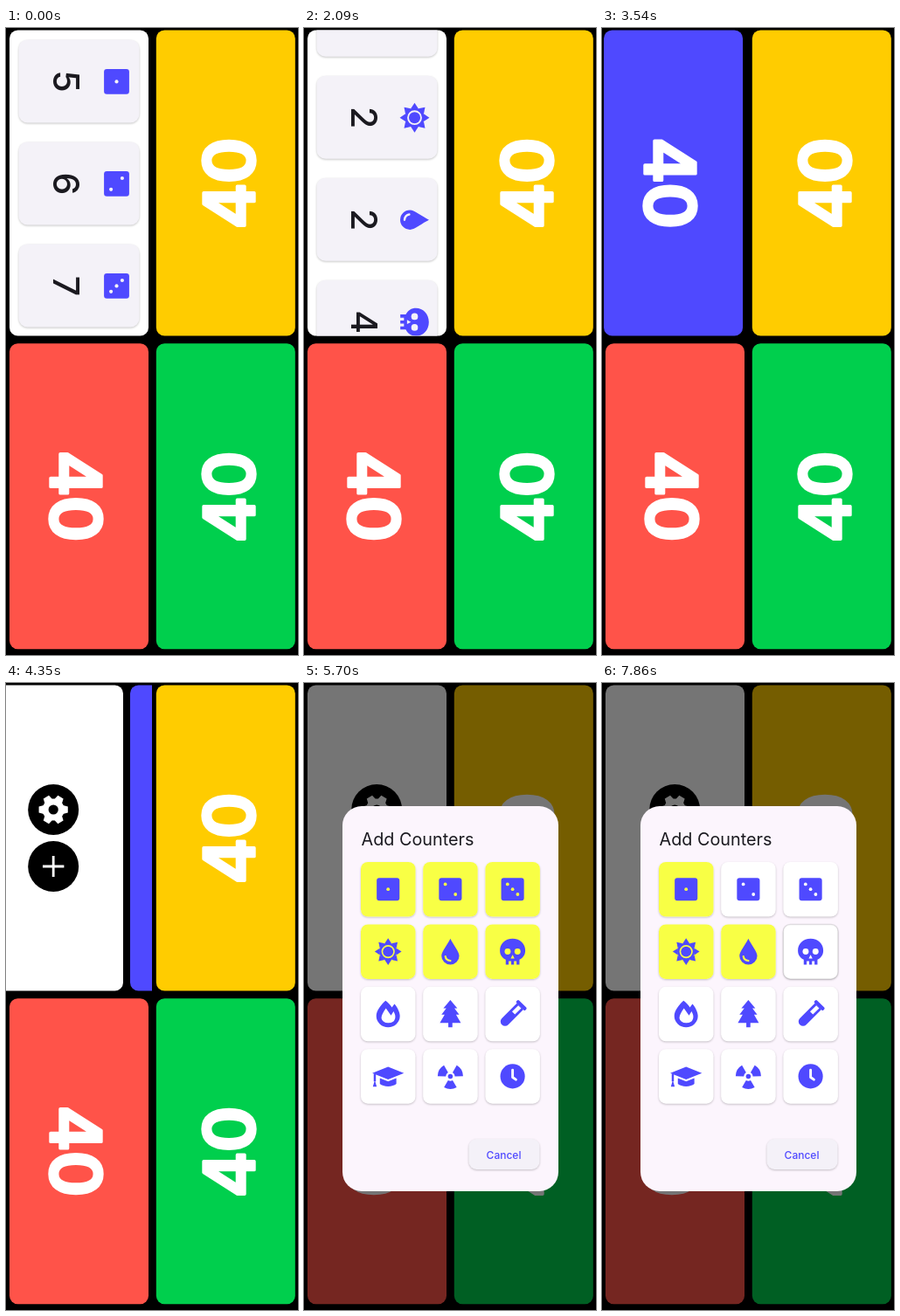
An HTML page for the animation above (7990 ms loop, 334x718 px).

```html
<!DOCTYPE html>
<html lang="en">
<head>
<meta charset="utf-8">
<title>Counters</title>
<style>
  html, body { margin: 0; width: 100%; height: 100%; overflow: hidden; background: #000; }
  svg { display: block; width: 100%; height: 100%; }
  text { font-family: Inter, Roboto, sans-serif; text-anchor: middle; }
  .big { font-size: 80px; font-weight: 600; fill: #fff; letter-spacing: -1px;
    stroke: #fff; stroke-width: 3.4; stroke-linejoin: round; }
  .num { font-size: 41px; font-weight: 500; fill: #1b1a20; }
  .title { font-size: 19.8px; font-weight: 400; fill: #1b1a20; text-anchor: start; }
  .btn { font-size: 12px; font-weight: 500; fill: #4f49ff; }
  .icon { fill: #4f49ff; fill-rule: evenodd; }
  .icon .hole { fill: var(--bg); }
  .icon .cut { fill: none; stroke: var(--bg); stroke-width: 2; stroke-linecap: round; stroke-linejoin: round; }
  .icon .line { fill: none; stroke: #4f49ff; stroke-width: 1.7; }
  .raised { filter: drop-shadow(0 1px 1px rgba(0, 0, 0, .22)); }
</style>
</head>
<body>
<svg id="stage" viewBox="0 0 334 718"></svg>
<script>
const LOOP = 7990, BLUE = '#4f49ff', CARD = '#f4f2f8', PITCH = 117, PAGE = 167;
const TOP = 2.5, BOTTOM = 361.2, LEFT = 4, RIGHT = 171.8;

const rect = (x, y, w, h, r, fill, more = '') =>
  `<rect x="${x}" y="${y}" width="${w}" height="${h}" rx="${r}" fill="${fill}" ${more}/>`;
const circle = (x, y, r, more = '') => `<circle cx="${x}" cy="${y}" r="${r}" ${more}/>`;
const path = (d, more = '') => `<path d="${d}" ${more}/>`;
const group = (attrs, body) => `<g ${attrs}>${body}</g>`;
const at = (x, y, body, turn = 0, scale = 1) =>
  group(`transform="translate(${x} ${y}) rotate(${turn}) scale(${scale})"`, body);
const label = (x, y, turn, cls, s) => at(x, y, `<text class="${cls}">${s}</text>`, turn);
const spin = (n, body) => Array.from({ length: n }, (_, i) =>
  group(`transform="rotate(${i * 360 / n})"`, body)).join('');

// Icons sit on a 24-unit grid centred on the origin.
const die = pips => rect(-9, -9, 18, 18, 2, BLUE) +
  pips.map(p => circle(p, p, 1.3, 'class="hole"')).join('');
const icons = [
  die([0]),
  die([-4, 4]),
  die([-4, 0, 4]),
  circle(0, 0, 4.1) + circle(0, 0, 6.1, 'class="line"') + spin(8, path('M0-10.6L2.7-6.5H-2.7Z')),
  path('M0-10.3C2-6 7 0 7 3.3A7 7 0 0 1-7 3.3C-7 0-2-6 0-10.3Z') +
    path('M-3.9 3.8Q-3.5 6.8 0 7.2', 'class="cut" style="stroke-width:1.5"'),
  path('M0-10.2C-6-10.2-10-6-10-1C-10 2.4-8.4 4.8-5.4 6.3V10.2H-3.1V7.6H-1.1V10.2H1.1V7.6H3.1V10.2H5.4V6.3' +
    'C8.4 4.8 10 2.4 10-1C10-6 6-10.2 0-10.2Z') +
    circle(-3.9, 0, 2.4, 'class="hole"') + circle(3.9, 0, 2.4, 'class="hole"') +
    path('M0 2.6L1.5 5.4H-1.5Z', 'class="hole"'),
  path('M-2-10.5C0-9 2-7 3-5.2L5-8C7.5-5.5 9.3-1 9.3 1.5A9.3 9 0 0 1-9.3 1.5C-9.3-2.5-5.5-7.5-2-10.5Z' +
    'M-1.7-4.5L2.3 1.2L4.3-2C5.5 0 6 1.8 5.5 3.6A5.5 4.6 0 0 1-5.3 3.2C-5.3 1-3.5-2-1.7-4.5Z'),
  path('M0-11L5.5-4.5H3.2L7 .5H4.5L8.3 7H1.6V10.5H-1.6V7H-8.3L-4.5 .5H-7L-3.2-4.5H-5.5Z'),
  at(0, 0, rect(-5, -11.2, 10, 2.8, 1, BLUE) +
    path('M-3.6-8.6H3.6V8.4A3.6 3.6 0 0 1-3.6 8.4ZM-1.6-8V-1H1.6V-8Z'), 45),
  path('M0-7.5L12.5-2.5L0 2.5L-12.5-2.5Z') + path('M-6.5 1.4L0 4L6.5 1.4V6C4 8.6-4 8.6-6.5 6Z') +
    path('M-10.5-2V4', 'class="line"') + path('M-10.5 3L-9 8.2H-12Z'),
  circle(0, 0, 1.9) + spin(3, path('M-1.8 3.1L-5 8.7A10 10 0 0 0 5 8.7L1.8 3.1A3.6 3.6 0 0 1-1.8 3.1Z')),
  circle(0, 0, 9.7) + path('M0-5V.8L2.6 2.6', 'class="cut"')
];
const icon = (i, x, y, turn, scale, bg) =>
  group(`class="icon" style="--bg:${bg}"`, at(x, y, icons[i], turn, scale));

const panel = (x, y, fill) => rect(x, y, 159, 350, 9.5, fill);

const list = [5, 6, 7, 2, 2, 4].map((n, i) => {
  const y = 61.4 + i * PITCH;
  return rect(14.5, y - 48, 138, 95, 10, CARD, 'class="raised"') +
    icon(i, 126.5, y, 90, 1.6, CARD) + label(54.3, y, 90, 'num', n);
}).join('');

const gear = circle(0, 0, 12.5, 'fill="#fff"') +
  spin(6, path('M10-5.2L16.6-3.6V3.6L10 5.2Z', 'fill="#fff"')) + circle(0, 0, 5.6);
const settings = panel(LEFT, TOP, '#fff') + circle(83.2, 145, 29) + circle(83.2, 210, 29) +
  at(83.2, 145, gear) + path('M71 210H95.4M83.2 198V222', 'stroke="#fff" stroke-width="2.8"');

const pages = panel(LEFT, TOP, '#fff') +
  group('clip-path="url(#panelClip)"', group('id="list"', list)) +
  at(-PAGE, 0, panel(LEFT, TOP, BLUE) + label(51, 177, 90, 'big', 40)) +
  at(-2 * PAGE, 0, settings);

const tiles = icons.map((_, i) => {
  const x = 65 + i % 3 * 71.2, y = 205 + Math.floor(i / 3) * 71.4;
  return rect(x, y, 62.5, 62.5, 8, '#fff', 'class="raised"') +
    (i < 6 ? rect(x, y, 62.5, 62.5, 8, '#f8ff45', `id="on${i}"`) : '') +
    rect(x, y, 62.5, 62.5, 8, 'none', `id="press${i}" stroke="#000" stroke-width="1.5" opacity="0"`) +
    group(`id="icon${i}"`, icon(i, x + 31.2, y + 31.2, 0, 1.45, i < 6 ? '#f8ff45' : '#fff'));
}).join('');

const dialog = rect(0, 0, 334, 718, 0, '#000', 'opacity=".54"') +
  rect(44, 141, 247, 441, 22, '#fcf5fd') +
  '<text class="title" x="65.5" y="185.5">Add Counters</text>' + tiles +
  rect(188.5, 522, 81, 35, 9, '#f4f1f8', 'class="raised"') +
  '<text class="btn" x="228.5" y="545">Cancel</text>';

document.getElementById('stage').innerHTML =
  `<clipPath id="pageClip">${rect(0, 0, PAGE, 357, 0, '#000')}</clipPath>` +
  `<clipPath id="panelClip">${panel(LEFT, TOP, '#000')}</clipPath>` +
  rect(0, 0, 334, 718, 0, '#000') +
  panel(RIGHT, TOP, '#fc0') + label(283.5, 178.5, -90, 'big', 40) +
  panel(LEFT, BOTTOM, '#ff5349') + label(51, 535.5, 90, 'big', 40) +
  panel(RIGHT, BOTTOM, '#00cf4d') + label(283.5, 537.5, -90, 'big', 40) +
  group('clip-path="url(#pageClip)"', group('id="pages"', pages)) +
  group('id="dialog"', dialog);

const $ = id => document.getElementById(id);
const span = (t, start, length) => Math.min(1, Math.max(0, (t - start) / length));
const out = (p, n) => 1 - (1 - p) ** n;
const inOut = p => p < .5 ? 2 * p * p : 1 - 2 * (1 - p) ** 2;

// Tile index and the time it is switched off.
const taps = [[1, 6840], [2, 7280], [5, 7720]];

function draw(t) {
  const scroll = 3 * PITCH * (out(span(t, 770, 837), 2) - inOut(span(t, 1880, 870)));
  const slide = PAGE * (out(span(t, 3250, 376), 3) + out(span(t, 4130, 500), 3));
  $('list').setAttribute('transform', `translate(0 ${-scroll})`);
  $('pages').setAttribute('transform', `translate(${slide} 0)`);
  $('dialog').setAttribute('opacity', span(t, 5590, 110));
  for (const [i, time] of taps) {
    const off = span(t, time, 80);
    $('on' + i).setAttribute('opacity', 1 - off);
    $('press' + i).setAttribute('opacity', t < time ? 0 : .12 * (1 - span(t, time + 120, 140)));
    $('icon' + i).firstChild.style.setProperty('--bg', off < .5 ? '#f8ff45' : '#fff');
  }
}

const start = performance.now();
function tick() {
  draw((performance.now() - start) % LOOP);
  requestAnimationFrame(tick);
}
tick();
</script>
</body>
</html>
```
